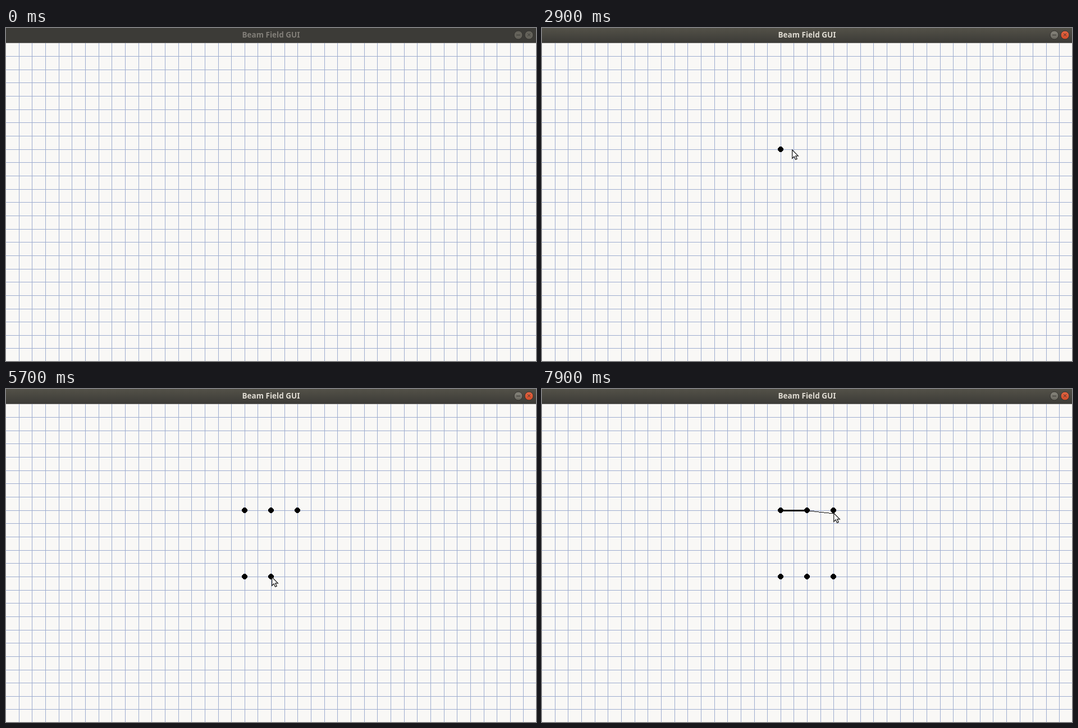
Write an HTML page that moves like this. It is 944 px wide and 593 px high and loops after 8000 ms.

```html
<!DOCTYPE html>
<html lang="en">
<head>
<meta charset="utf-8">
<title>Beam Field GUI</title>
<style>
  html, body { margin: 0; width: 100%; height: 100%; overflow: hidden; background: #f9f8f6; }
  svg { display: block; width: 944px; height: 593px; }
  .title { font: bold 13.5px "Noto Sans", "Open Sans", sans-serif; text-anchor: middle; }
  #grid, #dots, #edge, #drag { shape-rendering: crispEdges; }
</style>
</head>
<body>
<svg viewBox="0 0 944 593">
  <defs>
    <linearGradient id="bar" x2="0" y2="1">
      <stop stop-color="#535148"/><stop offset="1" stop-color="#3c3b37"/>
    </linearGradient>
    <linearGradient id="grey" x2="0" y2="1">
      <stop stop-color="#86847b"/><stop offset="1" stop-color="#69675f"/>
    </linearGradient>
    <linearGradient id="red" x2="0" y2="1">
      <stop stop-color="#e56643"/><stop offset="1" stop-color="#d04b29"/>
    </linearGradient>
    <path id="glyphs" d="M909 12.5h7M929 9.5l5 5m0-5l-5 5" fill="none"/>
  </defs>
  <rect width="944" height="593" fill="#f9f8f6"/>
  <path id="grid" stroke="#9daccf" fill="none"/>

  <g id="idleBar">
    <rect width="944" height="26" fill="#3c3b37"/>
    <text class="title" x="472" y="17" fill="#817e78">Beam Field GUI</text>
    <g fill="#64625a" stroke="#34332f">
      <circle cx="912.5" cy="12.5" r="7.5"/><circle cx="931.5" cy="12.5" r="7.5"/>
    </g>
    <use href="#glyphs" stroke="#3a3935"/>
  </g>
  <g id="activeBar">
    <rect width="944" height="26" fill="url(#bar)"/>
    <text class="title" x="472" y="17" fill="#dfdbd2">Beam Field GUI</text>
    <g stroke="#33322e">
      <circle cx="912.5" cy="12.5" r="7.5" fill="url(#grey)"/>
      <circle cx="931.5" cy="12.5" r="7.5" fill="url(#red)"/>
    </g>
    <use href="#glyphs" stroke="#35342f"/>
  </g>
  <path d="M0 26.5H944" stroke="#6b6a69"/>

  <path id="edge" d="M425 216.5H472" stroke="#000" stroke-width="3"/>
  <line id="drag" stroke="#111"/>
  <g id="dots"></g>
  <path id="cursor" d="M.7 1V16.2L4.1 12.9L6.6 18.3L9.2 17.2L6.8 11.8H11.3Z"
        fill="#fff" stroke="#1c1c1c" stroke-width="1.25"/>
</svg>
<script>
const LOOP = 8000, STEP = 100, PITCH = 23.65, DWELL = 200;
const DRAG_START = 7000, LINKED = 7400, NEXT_DRAG = 7600;
const el = id => document.getElementById(id);
const show = (node, on) => node.setAttribute("visibility", on ? "visible" : "hidden");
const setAll = (node, attributes) =>
  Object.entries(attributes).forEach(([key, value]) => node.setAttribute(key, value));

// Two rows of three points; each appears once the pointer has rested on it
const dots = [2500, 3200, 3900, 5000, 5500, 6000].map((arrival, i) => {
  const x = 425 + i % 3 * 2 * PITCH;
  const y = 216 + Math.floor(i / 3) * 5 * PITCH;
  const node = document.createElementNS("http://www.w3.org/2000/svg", "circle");
  setAll(node, { cx: Math.floor(x), cy: Math.floor(y), r: 4.9 });
  el("dots").append(node);
  return { arrival, x, y, node };
});

// Pointer waypoints: time in ms, x, y
const route = [
  [500, 105, 43], [1000, 534, 467], [1300, 430, 216], [1900, 430, 217], [2200, 452, 217],
  [4700, 427, 309], [6700, 416, 220], [6900, 421, 218],
  [LINKED, 471, 220], [LINKED + STEP, 471, 220], [7900, 519, 220],
  ...dots.flatMap(({ arrival, x, y }) =>
    [arrival, arrival + DWELL].map(time => [time, x + 1, y]))
].sort((a, b) => a[0] - b[0]);

let gridPath = "";
for (let k = 1; k < 40; k++) gridPath += `M${Math.floor(PITCH * k - .38) + .5} 27V593`;
for (let k = 1; k < 24; k++) gridPath += `M0 ${Math.floor(PITCH * k + 27.02) + .5}H944`;
el("grid").setAttribute("d", gridPath);

function pointerAt(time) {
  const next = route.findIndex(point => point[0] > time);
  if (next < 0) return route.at(-1).slice(1);
  if (next === 0) return route[0].slice(1);
  const [t0, x0, y0] = route[next - 1], [t1, x1, y1] = route[next];
  const mix = (time - t0) / (t1 - t0);
  return [x0 + (x1 - x0) * mix, y0 + (y1 - y0) * mix].map(Math.round);
}

function draw(now) {
  const time = Math.floor(now % LOOP / STEP) * STEP;
  const [x, y] = pointerAt(time);
  show(el("cursor"), time >= 400);
  el("cursor").setAttribute("transform", `translate(${x} ${y})`);
  el("activeBar").setAttribute("opacity", Math.min(1, Math.max(0, (time - 1400) / 300)));
  dots.forEach(dot => show(dot.node, time >= dot.arrival + DWELL));

  const linked = time >= LINKED;
  show(el("edge"), linked);
  show(el("drag"), time >= (linked ? NEXT_DRAG : DRAG_START));
  setAll(el("drag"), { x1: linked ? 472 : 425, y1: 216.5, x2: x, y2: y + 2 });
}

const origin = performance.now();
function tick() {
  draw(performance.now() - origin);
  requestAnimationFrame(tick);
}
tick();
</script>
</body>
</html>
```
